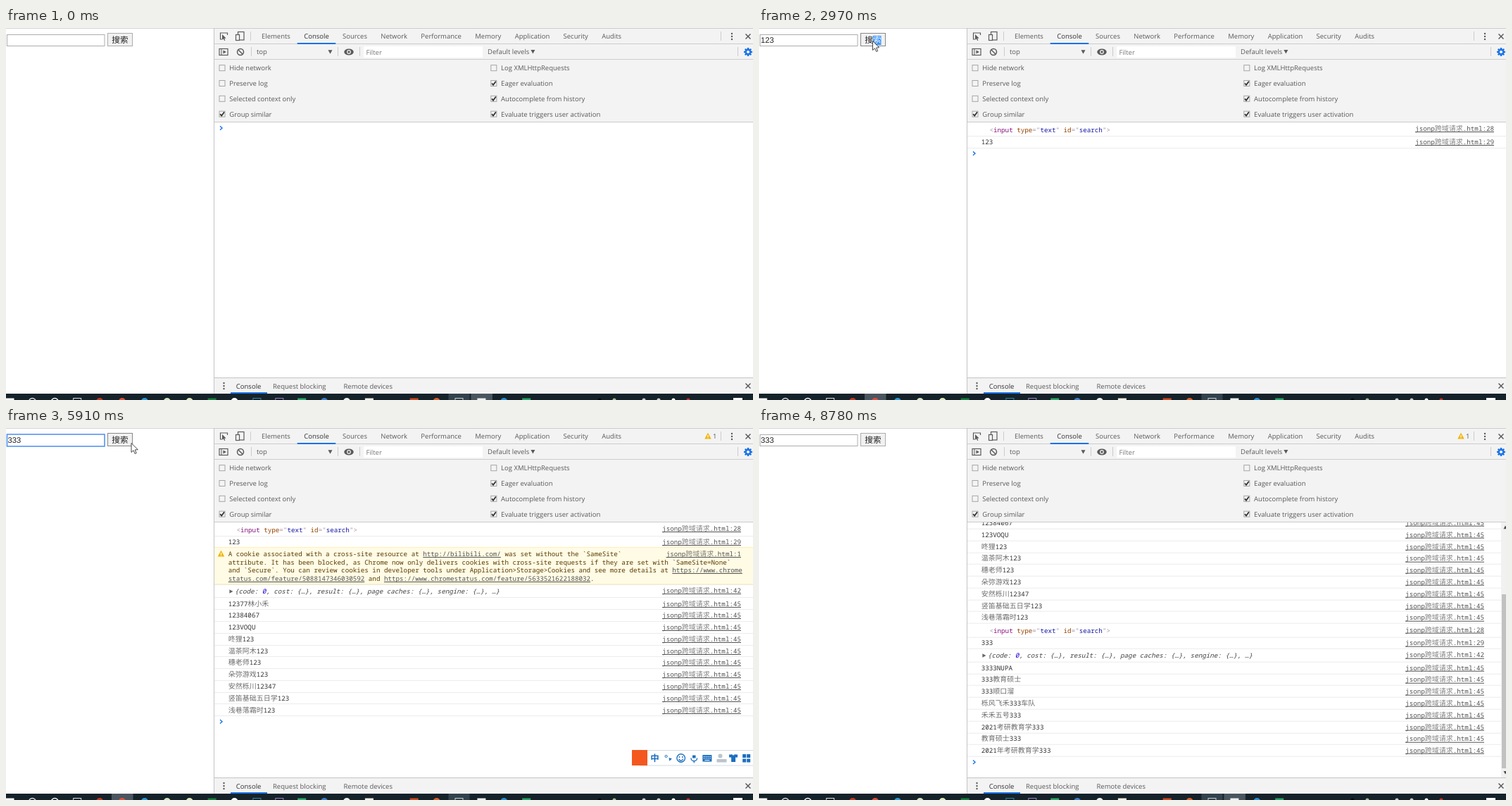
Animation of 1061x528 px, one loop 8850 ms. Source, as an HTML page with a canvas:

```html
<!DOCTYPE html>
<html lang="zh">
<head>
<meta charset="utf-8">
<title>Console search</title>
<style>
html, body { margin: 0; width: 100%; height: 100%; overflow: hidden; background: #fff; }
canvas { display: block; }
</style>
</head>
<body>
<canvas id="stage" width="1061" height="528"></canvas>
<script>
const ctx = document.getElementById('stage').getContext('2d');
const W = 1061, H = 528, LOOP = 8850, LEFT = 296;
const CJK = '"Noto Sans CJK SC", "Noto Sans CJK"';
const UI = '9.5px "Open Sans", "Noto Sans", sans-serif';
const MONO = '9.22px "Noto Sans Mono", "DejaVu Sans Mono", monospace';
const HAN = `300 10px ${CJK}, sans-serif`;
const BUTTON_FONT = `11.6px ${CJK}, sans-serif`;
const FIELD_FONT = '11.2px "Liberation Sans", Arial, sans-serif';
const INK = '#333', GREY = '#5a5a5a', BLUE = '#1a73e8', LINE = '#ccc', PICK = '#3390ff';

const AT = {
  focus: 820, type: 1440, press: 2430, log: 2810, warn: 3040, reply: 3270,
  refocus: 3590, select: 3740, retype: 4890, repress: 6060, relog: 6310, leave: 8780
};
const KEY_GAP = 157;

// Pointer stops: arrives at `to` by moving from the previous stop since `from`.
const stop = (from, to, x, y) => ({ from, to, x, y });
const hide = from => ({ from, to: from, hidden: true });
const STOPS = [
  hide(0), stop(70, 70, 925, 505), stop(70, 210, 475, 240), stop(515, 820, 62, 17),
  stop(970, 1130, 151, 53), hide(1440),
  stop(1820, 1820, 149, 53), stop(1820, 2430, 161, 18), stop(3190, 3590, 92, 18),
  stop(4040, 4200, -6, 16), hide(4430),
  stop(5270, 5270, 0, 31), stop(5270, 5520, 183, 19), stop(5700, 5910, 177.5, 21),
  stop(6310, 6610, 366, 91), stop(6995, 7740, 1046, 500), stop(7740, 7920, 1003, 518), hide(8000)
];

const FIRST = ['12377林小禾', '12384067', '123VOQU', '咚狸123', '温茶阿木123', '穗老师123',
  '朵弥游戏123', '安然栎川12347', '竖笛基础五日学123', '浅巷落霜时123'];
const SECOND = ['3333NUPA', '333教育硕士', '333顺口溜', '栎风飞禾333车队', '禾禾五号333',
  '2021考研教育学333', '教育硕士333', '2021年考研教育学333'];
const WARNING = [
  'A cookie associated with a cross-site resource at http://bilibili.com/ was set without the `SameSite`',
  'attribute. It has been blocked, as Chrome now only delivers cookies with cross-site requests if they are set with `SameSite=None`',
  'and `Secure`. You can review cookies in developer tools under Application>Storage>Cookies and see more details at https://www.chrome',
  'status.com/feature/5088147346030592 and https://www.chromestatus.com/feature/5633521622188032.'
];

const within = (t, a, b) => t >= a && t < b;
const focused = t => within(t, AT.focus, AT.press) || within(t, AT.refocus, AT.repress);
const pressed = t => within(t, AT.focus, AT.focus + 150) || within(t, AT.press, AT.log) ||
  within(t, AT.select, AT.select + 690) || within(t, AT.repress, AT.relog);

function rect(x, y, w, h, color) {
  ctx.fillStyle = color;
  ctx.fillRect(x, y, w, h);
}
function box(x, y, w, h, color, width = 1) {
  ctx.strokeStyle = color;
  ctx.lineWidth = width;
  ctx.strokeRect(x, y, w, h);
}
function disc(x, y, r, color) {
  ctx.fillStyle = color;
  ctx.beginPath();
  ctx.arc(x, y, r, 0, 7);
  ctx.fill();
}
function arc(x, y, r, color, width = 1, from = 0, to = 7) {
  ctx.strokeStyle = color;
  ctx.lineWidth = width;
  ctx.beginPath();
  ctx.arc(x, y, r, from, to);
  ctx.stroke();
}
function trace(pts) {
  ctx.beginPath();
  for (let i = 0; i < pts.length; i += 2) ctx.lineTo(pts[i], pts[i + 1]);
}
function poly(pts, color) {
  trace(pts);
  ctx.closePath();
  ctx.fillStyle = color;
  ctx.fill();
}
function stroke(pts, color, width = 1) {
  trace(pts);
  ctx.strokeStyle = color;
  ctx.lineWidth = width;
  ctx.stroke();
}
function at(x, y, paint) {
  ctx.save();
  ctx.translate(x, y);
  paint();
  ctx.restore();
}
function clip(x, y, w, h, paint) {
  ctx.save();
  ctx.beginPath();
  ctx.rect(x, y, w, h);
  ctx.clip();
  paint();
  ctx.restore();
}
function text(s, x, y, color = GREY, font = UI) {
  ctx.font = font;
  ctx.fillStyle = color;
  ctx.fillText(s, x, y);
  return x + ctx.measureText(s).width;
}

// Console text: Latin and Han runs use different faces.
const pieces = s => s.match(/[\u4e00-\u9fff]+|[^\u4e00-\u9fff]+/g);
const isHan = s => /[\u4e00-\u9fff]/.test(s);
function mono(s, x, cy, color = INK, { under = false, slant = '' } = {}) {
  const start = x, y = cy + 3.2;
  for (const p of pieces(s)) {
    ctx.globalAlpha = isHan(p) ? .72 : 1;
    x = text(p, x, y, color, slant + (isHan(p) ? HAN : MONO));
  }
  ctx.globalAlpha = 1;
  if (under) rect(start, Math.round(y + 1), x - start, 1, color);
  return x;
}
function monoWidth(s) {
  return pieces(s).reduce((w, p) => {
    ctx.font = isHan(p) ? HAN : MONO;
    return w + ctx.measureText(p).width;
  }, 0);
}

function arrow(scale, fill, edge) {
  ctx.scale(scale, scale);
  poly([0, 0, 0, 13, 3, 10.3, 5.2, 15, 7.2, 14.1, 5.2, 9.5, 9.3, 9.2], fill);
  if (edge) {
    ctx.strokeStyle = edge;
    ctx.lineWidth = 1;
    ctx.stroke();
  }
}
function dots(x, y) {
  for (const d of [-4, 0, 4]) disc(x, y + d, 1.2, GREY);
}
function cross(x, y) {
  for (const d of [-3.5, 3.5]) stroke([x - d, y - 3.5, x + d, y + 3.5], GREY, 1.5);
}
function chevron(x, y) {
  stroke([x, y - 2.7, x + 3, y, x, y + 2.7], BLUE, 1.4);
}
function triangle(x, y, r, turn, color) {
  at(x, y, () => {
    ctx.rotate(turn);
    poly([-r, -r * .85, r, -r * .85, 0, r], color);
  });
}
function warnSign(x, y) {
  triangle(x, y, 4.7, Math.PI, '#f0b400');
  rect(x - .6, y - 1.5, 1.2, 3, '#fff');
  rect(x - .6, y + 2, 1.2, 1, '#fff');
}
function gear(x, y) {
  for (let a = 0; a < 6; a += Math.PI / 4) {
    const c = Math.cos(a), s = Math.sin(a);
    stroke([x + c * 3, y + s * 3, x + c * 6, y + s * 6], BLUE, 2.4);
  }
  arc(x, y, 3.3, BLUE, 2.4);
}
function check(label, x, y, on) {
  rect(x - 4.5, y - 4.5, 9, 9, '#f4f4f4');
  box(x - 4, y - 4, 8, 8, '#a5a5a5');
  if (on) stroke([x - 2.8, y, x - .8, y + 2.4, x + 3, y - 2.8], INK, 1.8);
  text(label, x + 10.3, y + 3.4);
}

function typed(t) {
  const [s, from] = t < AT.retype ? ['123', AT.type] : ['333', AT.retype];
  return s.slice(0, Math.max(0, Math.floor((t - from) / KEY_GAP) + 1));
}
function page(t) {
  rect(0, 0, W, H, '#fff');
  rect(0, 0, 295, 1, '#d4d4d4');
  if (focused(t)) box(1.5, 9, 138.5, 17, '#4a8df0', 1.5);
  else box(1.5, 9.5, 138.5, 16, '#adadad');
  const picked = within(t, AT.select, AT.retype);
  if (picked) rect(2, 11, 19.5, 13, PICK);
  text(typed(t), 2.5, 21, picked ? '#fff' : '#222', FIELD_FONT);

  const hot = within(t, AT.press, AT.reply) || within(t, 5520, 6400);
  rect(144, 7, 36, 19, '#f1f1f1');
  box(144.5, 7.5, 35, 18, hot ? '#888' : '#adadad');
  const marked = within(t, AT.log, AT.refocus);
  const x = text('搜', 150.3, 21.2, '#222', BUTTON_FONT);
  if (marked) rect(x, 11, 11.6, 13, PICK);
  text('索', x, 21.2, marked ? '#fff' : '#222', BUTTON_FONT);
}

function tabs(t) {
  at(307, 9, () => arrow(.6, GREY));
  stroke([307, 16, 304.5, 16, 304.5, 7, 314.5, 7, 314.5, 10], GREY, 1.2);
  box(329.5, 5.5, 8.5, 11.5, GREY, 1.2);
  rect(326, 9, 6, 9, '#f3f3f3');
  box(326.5, 9.5, 5, 8, GREY, 1.2);
  let x = 363;
  for (const name of 'Elements Console Sources Network Performance Memory Application Security Audits'.split(' ')) {
    const on = name === 'Console', end = text(name, x, 15.2, on ? INK : GREY);
    if (on) rect(x - 9.5, 21, end - x + 19, 2, BLUE);
    x = end + 19.3;
  }
  if (t >= AT.warn) {
    warnSign(997, 11.5);
    text('1', 1004, 15.2);
  }
  dots(1031, 12);
  cross(1054, 12);
}
function filters() {
  box(303, 29.5, 12, 9, GREY, 1.2);
  rect(305.5, 30, 1, 9, GREY);
  triangle(310.5, 34, 2.4, -Math.PI / 2, GREY);
  arc(333, 34, 4.5, GREY, 1.5);
  stroke([330, 31, 336, 37], GREY, 1.5);
  text('top', 356, 37.2);
  triangle(460.5, 33.8, 3, 0, GREY);
  at(487, 34, () => {
    ctx.scale(1.5, 1);
    disc(0, 0, 4.5, GREY);
  });
  arc(487, 34, 2.3, '#f3f3f3', 1.2);
  rect(508, 26, 169, 16, '#fff');
  text('Filter', 511.5, 37.6, '#777');
  triangle(text('Default levels', 684, 37.2) + 5, 33.5, 3, 0, GREY);
  for (const x of [348, 471, 502, 1039]) rect(x, 27, 1, 13, LINE);
  gear(1054, 34);

  const left = ['Hide network', 'Preserve log', 'Selected context only', 'Group similar'];
  const right = ['Log XMLHttpRequests', 'Eager evaluation', 'Autocomplete from history',
    'Evaluate triggers user activation'];
  for (let i = 0; i < 4; i++) {
    const y = 56.7 + i * 21.8;
    check(left[i], 307, y, i === 3);
    check(right[i], 692.8, y, i > 0);
  }
}
function drawer() {
  rect(LEFT, 496, 765, 23, '#f3f3f3');
  rect(LEFT, 496, 765, 1, '#c4c4c4');
  dots(309.5, 508);
  text('Console', 326.8, 511.7, INK);
  text('Request blocking', 379, 511.7);
  text('Remote devices', 479.5, 511.7);
  rect(319, 517, 52, 2, BLUE);
  cross(1054, 508);
}
function tools(t) {
  rect(295, 0, 1, 519, '#c4c4c4');
  rect(LEFT, 0, 765, 133, '#f3f3f3');
  for (const y of [0, 22, 44, 133]) rect(LEFT, y, 765, 1, LINE);
  for (const x of [347, 1015]) rect(x, 5, 1, 13, LINE);
  tabs(t);
  filters();
  drawer();
}

// Each row draws itself below `top` and returns its bottom edge.
function finish(bottom, cy, line, right) {
  const s = `jsonp跨域请求.html:${line}`;
  mono(s, right - monoWidth(s), cy, '#545454', { under: true });
  rect(LEFT, Math.round(bottom - .5), 765, 1, '#ececec');
  return bottom;
}
function textRow(s, top, line, right) {
  mono(s, 315.7, top + 8.4);
  return finish(top + 16.78, top + 8.4, line, right);
}
function inputRow(top, right) {
  let x = 327.5;
  const tints = { input: '#881280', type: '#994500', id: '#994500', text: '#1a1aa6', search: '#1a1aa6' };
  for (const s of '<input type="text" id="search">'.match(/\w+|\W+/g))
    x = mono(s, x, top + 10.5, tints[s] || '#a894a6');
  return finish(top + 19.3, top + 9, 28, right);
}
function objectRow(top, right) {
  const cy = top + 9.5, slant = 'italic ';
  triangle(319.7, cy, 2.7, -Math.PI / 2, '#666');
  let x = mono('{code: ', 325, cy, '#444', { slant });
  x = mono('0', x, cy, '#1c00cf', { slant });
  mono(', cost: {…}, result: {…}, page caches: {…}, sengine: {…}, …}', x, cy, '#444', { slant });
  return finish(top + 18.5, cy - 1, 42, right);
}
function warningRow(top, right) {
  const bottom = top + 52.4;
  rect(LEFT, 169, 765, 53, '#fffbe5');
  WARNING.forEach((s, i) => {
    let x = 315.7;
    for (const p of s.split(/((?:https?:|status\.com)[\w./:]*\w\/?)/)) {
      if (!p) continue;
      const under = /^(http|status)/.test(p);
      x = mono(p, x, top + 8.7 + i * 11.75, under ? '#545454' : '#5c3c00', { under });
    }
  });
  warnSign(305.5, top + 8.4);
  finish(bottom, top + 8.7, 1, right);
  for (const y of [169, 221]) rect(LEFT, y, 765, 1, '#fff0b5');
  return bottom;
}
function log(t) {
  const full = t >= AT.relog, right = full ? 1030 : 1044;
  clip(LEFT, 134, 765, 362, () => {
    if (full) ctx.translate(0, -131.3);
    let y = 134;
    if (t >= AT.log) y = textRow('123', inputRow(y, right), 29, right);
    if (t >= AT.warn) y = warningRow(y, right);
    if (t >= AT.reply) {
      y = objectRow(y, right);
      for (const s of FIRST) y = textRow(s, y, 45, right);
    }
    if (full) {
      y = objectRow(textRow('333', inputRow(y, right), 29, right), right);
      for (const s of SECOND) y = textRow(s, y, 45, right);
    }
    chevron(304, y + 8);
  });
  if (!full) return;
  rect(1054, 134, 7, 362, '#f1f1f1');
  rect(1055, 236, 6, 247, '#c1c1c1');
  triangle(1060, 141, 2.5, Math.PI, '#505050');
  triangle(1060, 489, 2.5, 0, '#505050');
}

// Input-method icons, each drawn around its own centre.
const TINT = '#1b6fc0', PALE = '#b9c4ce';
const ICONS = [
  () => text('中', -6.3, 4.5, TINT, `bold 12.5px ${CJK}, sans-serif`),
  () => {
    arc(-2.5, -2.5, 1.6, TINT);
    triangle(3, 2, 2.3, .3, TINT);
  },
  () => {
    arc(0, 0, 5.8, TINT, 1.4);
    for (const x of [-2.2, 2.2]) disc(x, -1.5, 1, TINT);
    arc(0, .5, 3, TINT, 1.4, .2, 2.9);
  },
  () => {
    stroke([0, -4, 0, 0], TINT, 4.5);
    arc(0, 0, 4.3, TINT, 1.4, 0, Math.PI);
    rect(-.6, 4, 1.2, 3, TINT);
  },
  () => {
    rect(-6.5, -4.5, 13, 9.5, TINT);
    for (let i = 0; i < 8; i++) rect(-5 + i % 4 * 2.8, -2.7 + (i >> 2) * 2.4, 1.4, 1.2, '#fff');
    rect(-3.5, 2.5, 7, 1, '#fff');
  },
  () => {
    disc(0, -3, 3, PALE);
    rect(-5, 1.5, 14, 4.5, PALE);
  },
  () => {
    rect(-6, -5, 12, 4, TINT);
    rect(-3, -5, 6, 10.5, TINT);
    disc(0, -5.5, 1.6, '#fff');
  },
  () => {
    for (const x of [-5.5, .5]) for (const y of [-5.5, 1]) rect(x, y, 5, 5, TINT);
  }
];
function inputBar() {
  rect(900, 458, 161, 21, '#fff');
  box(900.5, 457.5, 165, 21.5, '#d3dbe2');
  rect(889, 457, 22, 22, '#f4581f');
  ICONS.forEach((paint, i) => at(921.5 + i * 18.6, 468.5, paint));
}

// Visible tops of taskbar icons: d disc, o ring, s tile, b outlined tile.
const APPS = ('s#fff o#ddd o#fff b#ddd d#c0392b d#dd4f43 d#2f9bd8 d#d5e3c2 d#dfe8b8 s#17803d d#fff ' +
  'b#2f86a8 b#a07cc0 s#2faa6a d#3f7fc4 d#f0f0f0 s#f4f0e4 - s#cf4a25 d#d9622b b#ccc s#eee ' +
  'd#2b8fd4 s#27a567').split(' ');
const TRAY = '#05090c #aab89a #16222a #ccc #ccc #fff #c8372d'.split(' ');
const SHAPES = {
  d: (x, c) => disc(x, 530, 5, c),
  o: (x, c) => arc(x, 530.5, 5, c, 1.4),
  s: (x, c) => rect(x - 6, 525.5, 12, 3, c),
  b: (x, c) => box(x - 5.5, 525.5, 11, 8, c)
};
function taskbar(t) {
  const slot = i => 5.5 + i * 31.9;
  const active = within(t, AT.focus, AT.leave) ? 5 : 21;
  clip(0, 519, W, 9, () => {
    rect(0, 519, W, 9, '#16222a');
    rect(slot(20) - 15, 519, 30, 9, '#33424c');
    rect(slot(active) - 15, 519, 30.5, 9, '#4a565f');
    APPS.forEach((a, i) => SHAPES[a[0]]?.(slot(i), a.slice(1)));
    TRAY.forEach((c, i) => disc(843 + i * 21, 528, 2.5, c));
    rect(1033, 525, 13, 3, '#fff');
  });
}

function locate(t) {
  const i = STOPS.findLastIndex(s => t >= s.from);
  const b = STOPS[i], a = STOPS[i - 1];
  if (b.hidden) return null;
  const k = b.to > b.from ? Math.min(1, (t - b.from) / (b.to - b.from)) : 1;
  return k === 1 ? [b.x, b.y] : [a.x + (b.x - a.x) * k, a.y + (b.y - a.y) * k];
}
function pointer(t) {
  const spot = locate(t);
  if (!spot) return;
  const [x, y] = spot;
  if (pressed(t)) disc(x, y, 9.5, 'rgba(255,238,30,.88)');
  if (x < 141 && y > 8 && y < 27) {
    stroke([x, y - 6, x, y + 6], '#222', 1.2);
    for (const d of [-6.5, 6.5]) stroke([x - 3.5, y + d, x + 3.5, y + d], '#222', 1.2);
  } else {
    at(x + .5, y + .5, () => arrow(1, '#fff', '#444'));
  }
}

function draw(t) {
  ctx.textRendering = 'geometricPrecision';
  page(t);
  log(t);
  tools(t);
  if (focused(t)) inputBar();
  taskbar(t);
  pointer(t);
}

const start = performance.now();
function tick() {
  draw((performance.now() - start) % LOOP);
  requestAnimationFrame(tick);
}
tick();
</script>
</body>
</html>
```
